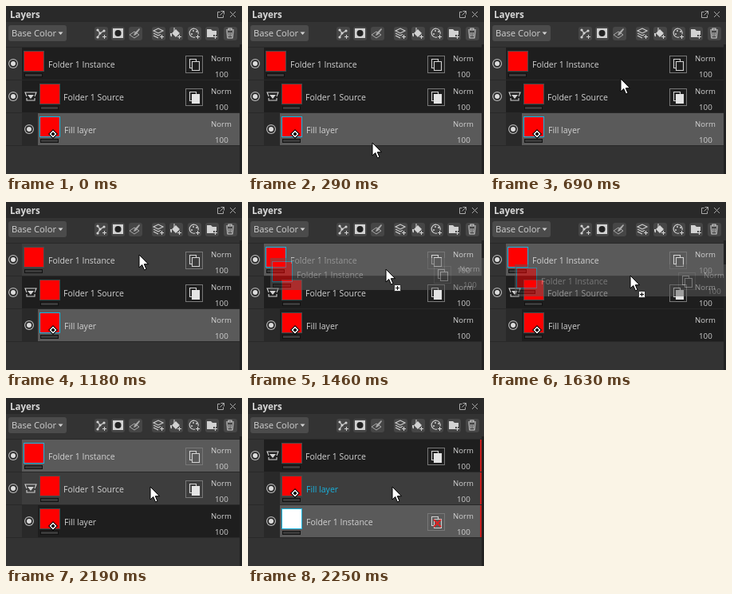
Write an HTML page with a canvas that moves like this. It is 296 by 210 pixels and loops after 4250 ms.

```html
<!DOCTYPE html>
<html lang="en">
<head>
<meta charset="utf-8">
<title>Layers panel</title>
<style>
  html, body { margin: 0; width: 100%; height: 100%; overflow: hidden; background: #333; }
  canvas { display: block; }
</style>
</head>
<body>
<canvas id="stage" width="296" height="210"></canvas>
<script>
const stage = document.getElementById('stage').getContext('2d');
const ghost = new OffscreenCanvas(296, 210).getContext('2d');
let ctx = stage;

const LOOP = 4250, STEP = 58;
const PRESS = 1280, DRAG = 1340, DROP = 2190, DONE = 2250;
const DARK = '#1e1e1e', HOVER = '#3d3d3d', SELECTED = '#5a5a5a';
const TEXT = '#d2d2d2', CYAN = '#18b4e0', RED = '#ff0000';
const ROWS = [52, 93, 134];

// Pointer track: time, x, y
const TRACK = [
  [60, 152, 205], [460, 161, 126], [690, 164, 91], [980, 167, 67],
  [1180, 167, 66], [1280, 167, 66], [1460, 173, 84], [1690, 178, 100],
  [1870, 180, 107], [1990, 181, 111]
];

const rect = (x, y, w, h, color) => { ctx.fillStyle = color; ctx.fillRect(x, y, w, h); };
const frame = (x, y, w, h, color) => {
  ctx.strokeStyle = color;
  ctx.lineWidth = 1;
  ctx.strokeRect(x + .5, y + .5, w - 1, h - 1);
};
function rounded(x, y, w, h, color) {
  ctx.fillStyle = color;
  ctx.beginPath();
  ctx.roundRect(x, y, w, h, 3);
  ctx.fill();
}
function disc(x, y, r, color) {
  ctx.fillStyle = color;
  ctx.beginPath();
  ctx.arc(x, y, r, 0, 7);
  ctx.fill();
}
function text(str, x, y, size = 10.5, color = TEXT, weight = 400) {
  ctx.font = `${weight} ${size}px "Open Sans", sans-serif`;
  ctx.fillStyle = color;
  ctx.fillText(str, x, y);
}
function shape(x, y, d, { fill, stroke, width = 1.1 }) {
  const path = new Path2D(d);
  ctx.save();
  ctx.translate(x, y);
  if (fill) { ctx.fillStyle = fill; ctx.fill(path); }
  if (stroke) { ctx.strokeStyle = stroke; ctx.lineWidth = width; ctx.stroke(path); }
  ctx.restore();
}

const line = { stroke: TEXT }, solid = { fill: TEXT }, thin = { stroke: '#aaa', width: 1 };
const PLUS = 'M2 4.5h5M4.5 2v5';

function toolbar() {
  rect(0, 0, 296, 20, '#292929');
  text('Layers', 5, 15, 11.5, '#d8d8d8', 700);
  shape(269.5, 10.5, 'M-1-3H-4V4H3V1M0-4H4V0M4-4L-1 1', thin);
  shape(284.5, 10.5, 'M-3.5-3.5L3.5 3.5M3.5-3.5L-3.5 3.5', thin);

  rounded(3, 24, 73, 20, '#4b4b4b');
  text('Base Color', 7, 38, 11.2);
  shape(68.5, 34, 'M-3-1.5H3L0 2Z', solid);
  for (const x of [119, 140, 162, 191, 213, 236, 258, 281]) rounded(x - 8, 26, 17, 17, '#464646');

  shape(119, 34, 'M-4-4L-1 0L-4 5M-1 0L4-3', line);
  for (const [x, y] of [[-4, -4], [-1, 0], [-4, 5], [4, -3]]) disc(119 + x, 34 + y, 1.6, TEXT);
  shape(119, 34, PLUS, line);

  rect(134, 28, 13, 12, TEXT);
  disc(140.5, 34, 4, '#222');
  shape(162, 34, 'M-7 2L-1-2L5 2L-1 6Z', thin);
  shape(162, 34, 'M-2 3L-1 0L5-6L6-5L1 2Z', { fill: '#aaa' });

  shape(191, 34, 'M-6-3L0-6L6-3L0 0ZM-6 0L0 3L3 1.5M-6 3L0 6', line);
  shape(191, 34, PLUS, line);
  shape(213, 34, 'M-5 0L0-5L5 0L0 5ZM-7 0Q-7 5-5 4V0Z', solid);
  shape(213, 34, 'M-2-2V-7', line);
  shape(213, 34, PLUS, line);
  shape(236, 34, 'M5 1A5.5 5.5 0 1 0 1 5', line);
  for (const [x, y] of [[-3, 1], [-1, -3], [3, -2]]) disc(236 + x, 34 + y, 1, TEXT);
  shape(236, 34, PLUS, line);
  shape(258, 34, 'M-6-5H-1L1-3H6V2H2V5H-6Z', solid);
  shape(258, 34, PLUS, line);
  shape(281, 34, 'M-5-4H5M-2-4V-6H2V-4M-4-3L-3 6H3L4-3M-1.3-1V4M1.3-1V4', line);
}

function eye(x, y) {
  disc(x, y, 6, '#b4b4b4');
  disc(x, y, 4.8, '#262626');
  disc(x, y, 3, '#dcdcdc');
}

function pages(y, { filled, broken }) {
  frame(225, y + 10, 22, 22, '#777');
  shape(225, y + 10, 'M8 15.5H5.5V4.5H13.5V7', line);
  shape(225, y + 10, 'M8.5 7.5H17.5V18.5H8.5Z', filled ? { fill: '#e4e4e4', stroke: '#e4e4e4' } : line);
  if (broken) shape(225, y + 10, 'M8 8L17 17M17 8L8 17', { stroke: '#e02020', width: 1.8 });
}

function row(y, { name, bg, indent = 0, folder, fill, link, selected, thumb = RED, color = TEXT }) {
  const x = 20 + indent, tx = x + (folder ? 22 : 2);
  rect(x, y, 293 - x, 40, bg);
  if (folder) {
    shape(31, y + 20, 'M-5 0L-7-5H7L5 0M-5 2V5H5V2', line);
    shape(31, y + 20, 'M-4-2H4L0 3Z', solid);
  }
  rect(tx + 1, y + 5, 24, 24, thumb);
  frame(tx, y + 4, 26, 26, selected ? CYAN : '#4a4a4a');
  rect(tx + 1, y + 32, 23, 5, '#111');
  rect(tx + 2, y + 33, 21, 3, '#3a3a3a');
  if (fill) {
    shape(tx + 17, y + 26, 'M-6 0L0-6L6 0L0 6Z', { fill: '#000' });
    shape(tx + 17, y + 26, 'M-3.5 0L0-3.5L3.5 0L0 3.5Z', { stroke: '#fff', width: 1.4 });
  }
  text(name, tx + (folder ? 30 : 31), y + 25, 10.5, color);
  if (link) pages(y, link);
  text('Norm', 257, y + 17, 9.6);
  text('100', 262, y + 37, 9.8);
}

function pointer([x, y], dragging) {
  shape(x, y, 'M0 0V16L3.7 12.5L6.5 19L9 18L6.3 11.7H11.5Z', { fill: '#fff', stroke: '#000', width: 1 });
  if (!dragging) return;
  rect(x + 10, y + 19, 9, 9, '#fff');
  frame(x + 10, y + 19, 9, 9, '#333');
  rect(x + 12, y + 23, 5, 1, '#000');
  rect(x + 14, y + 21, 1, 5, '#000');
}

function pointerAt(t) {
  const i = TRACK.findLastIndex(k => k[0] <= t);
  const a = TRACK[i], b = TRACK[i + 1];
  if (!b) return a.slice(1);
  const p = Math.floor((t - a[0]) / STEP) * STEP / (b[0] - a[0]);
  return [1, 2].map(n => Math.round(a[n] + (b[n] - a[n]) * p));
}

// Half-transparent copy of the dragged row
function dragImage(dx, dy, layer) {
  ctx = ghost;
  ctx.clearRect(0, 0, 296, 210);
  row(ROWS[0], layer);
  ctx = stage;
  ctx.globalAlpha = .5;
  ctx.drawImage(ghost.canvas, dx, dy);
  ctx.globalAlpha = 1;
}

function draw(t) {
  rect(0, 0, 296, 210, '#333');
  toolbar();
  rect(0, 51, 293, 124, '#292929');
  rect(293, 48, 3, 162, '#222');
  for (const y of ROWS) rect(0, y, 20, 40, '#333');

  const pos = t >= 60 ? pointerAt(t) : null;
  const py = pos ? pos[1] : 0;
  const over = py >= 52 && py < 90 ? 0 : py >= 93 && py < 133 ? 1 : -1;
  const shade = (i, selected) => selected ? SELECTED : i === over ? HOVER : DARK;
  const source = { name: 'Folder 1 Source', folder: true, link: { filled: true } };
  const layer = { name: 'Fill layer', indent: 20, fill: true };
  const instance = { name: 'Folder 1 Instance', link: {} };
  const dragging = t >= DRAG && t < DROP;

  if (t >= DONE) {
    row(ROWS[0], { ...source, bg: DARK });
    row(ROWS[1], { ...layer, bg: HOVER, color: CYAN });
    row(ROWS[2], { ...instance, bg: SELECTED, indent: 20, selected: true, thumb: '#fff', link: { broken: true } });
    for (const y of ROWS) rect(291, y, 2, 40, '#c81e1e');
    eye(9, 72);
    eye(29, 113);
  } else {
    const picked = t >= PRESS;
    row(ROWS[0], { ...instance, bg: shade(0, picked), selected: picked });
    row(ROWS[1], { ...source, bg: shade(1) });
    row(ROWS[2], { ...layer, bg: shade(2, !picked), selected: !picked });
    eye(9, 72);
    eye(9, 113);
  }
  eye(29, 154);

  if (dragging) {
    if (over === 1) frame(20, 93, 273, 40, '#fff');
    dragImage(pos[0] - 165, py - 66, { ...instance, bg: SELECTED, selected: true });
  }
  if (pos) pointer(pos, dragging);
}

function tick() {
  draw(performance.now() % LOOP);
  requestAnimationFrame(tick);
}
tick();
</script>
</body>
</html>
```
